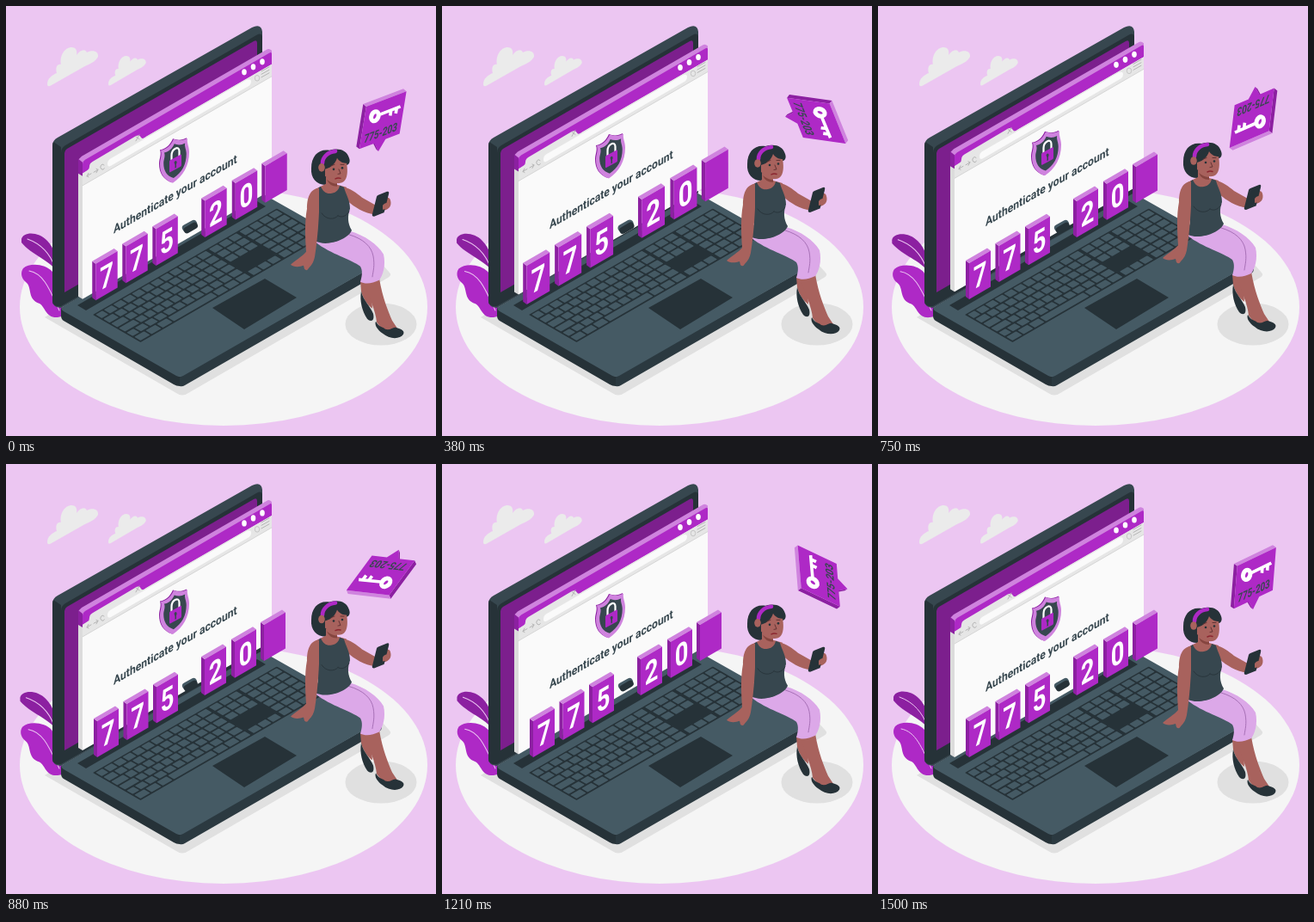
An HTML page for the animation above (1540 ms loop, 500 by 500 pixels).

```html
<!DOCTYPE html>
<html lang="en">
<head>
<meta charset="utf-8">
<title>Two-step sign-in</title>
<style>
html, body { margin: 0; width: 100%; height: 100%; overflow: hidden; background: #ecc6f2; }
svg { display: block; width: 100vw; height: 100vh; }
text { font-family: Roboto, "Open Sans", sans-serif; font-weight: 700; }
.p { fill: #ae29c6; } .l { fill: #cf83de; } .d { fill: #8c20a1; }
.k { fill: #263238; } .g { fill: #37474f; } .b { fill: #455a64; }
.s { fill: #a8625d; } .w { fill: #fafafa; } .e { fill: #e6e6e6; }
.line { fill: none; stroke-linecap: round; stroke-linejoin: round; }
</style>
</head>
<body>
<svg viewBox="0 0 500 500">
  <defs>
    <path id="cloud" d="M48 91C48 84 54 80 59 78C57 71 60 67 64 68C62 57 69 48 76 48C82 48 83 53 82 57C86 51 92 49 94 54C101 50 108 53 107 59C104 65 98 67 90 71L53 92Q48 95 48 91Z"/>
    <path id="shield" d="M180 168C187 167 192 162 195 155C200 157 206 157 211 154C210 160 213 163 213 170C213 186 206 198 194 206C184 203 179 195 179 184C179 178 182 174 180 168Z"/>
  </defs>
  <ellipse cx="253" cy="350" rx="237" ry="138" fill="#f5f5f5"/>
  <g fill="#ebebeb">
    <use href="#cloud"/>
    <use href="#cloud" transform="translate(83.5 21.5) scale(.74 .76)"/>
  </g>
  <ellipse cx="436" cy="370" rx="41.5" ry="24.5" fill="#e0e0e0"/>
  <path d="M45 362L64 350L437 300L446 310Q449 313 444 316L212 450Q205 455 198 450Z" fill="#e0e0e0"/>

  <g id="plant">
    <path class="d" d="M18 271C20 262 38 262 48 273C56 281 60 294 60 310C52 296 29 289 18 275Z"/>
    <path class="p" d="M20 305C28 298 46 300 54 309C59 317 60 332 60 344L68 353Q70 361 60 362C46 363 46 350 39 346C24 341 31 327 23 321C17 316 17 309 20 305Z"/>
    <path class="line" d="M25 271C42 277 52 290 57 304M27 308C44 311 51 330 62 354" stroke="#ecc6f2" stroke-width="1"/>
  </g>

  <!-- laptop -->
  <path class="k" d="M64 351L202 431V442Q198 442 195 440L67 366Q64 364 64 360Z"/>
  <path d="M202 431L437 297V306Q437 309 434 311L208 441Q205 443 202 442Z" fill="#2b3940"/>
  <path class="b" d="M67 349L296 217L434 295Q438 297 434 299L206 430Q202 432 198 430L67 355Q62 352 67 349Z"/>
  <path class="k" d="M83 348L93 354L302 233L292 227Z"/>
  <path class="g" d="M54 343V163Q54 156 60 153L286 25Q297 20 298 30V217L64 351Q54 350 54 343Z"/>
  <path class="k" d="M54 343V163Q54 160 55 158L64 164V349Q54 350 54 343Z"/>
  <path class="k" d="M64 349V171Q64 165 69 162L291 34Q298 30 298 37V217Z"/>
  <path d="M68 333V171Q68 168 71 166L288 41Q292 39 292 43V204Z" fill="#7c1f8d"/>
  <g id="keys" transform="matrix(.866 -.5 .866 .5 101 359)"></g>
  <path class="k" d="M240 351L301 317L338 339L277 376Z"/>

  <g id="window">
    <path class="l" d="M84 179L88 175L303 51Q306 49 309 52V56L89 184Z"/>
    <path class="d" d="M84 178L89 182V209L84 206Z"/>
    <path d="M84 195L89 198V341L84 338Z" fill="#dcdcdc"/>
    <path class="w" d="M89 184L309 57V214L89 341Z"/>
    <path class="p" d="M89 184Q89 181 92 179L306 55Q309 53 309 56V68L89 195Z"/>
    <path class="e" d="M89 195L95 191Q97 190 97 187Q97 183 101 181L150 152Q155 149 157 153Q159 156 163 152L309 68V82L89 209Z"/>
    <path class="w" d="M121 178L280 86Q285 84 285 88Q285 92 281 94L122 186Q118 188 118 184Q118 180 121 178Z"/>
    <path class="line" d="M89 209L309 82" stroke="#d6d6d6" stroke-width="1"/>
    <path class="line" d="M151 152L155 155M155 150L151 157M94 198L99 195M96 194.500L94 198L96 199M102 193.500L107 190.500M105 189.500L107 190.500L105 194M114 185A2.500 3 0 1 0 114.500 189M297 76L306 71M297 79.500L306 74.500M297 83L306 78" stroke="#b5b5b5" stroke-width="1"/>
    <ellipse cx="292" cy="84" rx="2.700" ry="3.300" fill="none" stroke="#c6c6c6"/>
    <g fill="#fff">
      <ellipse cx="277" cy="77" rx="2.800" ry="3.600"/>
      <ellipse cx="287.500" cy="71" rx="2.800" ry="3.600"/>
      <ellipse cx="298" cy="65" rx="2.800" ry="3.600"/>
    </g>
    <use href="#shield" class="d" x="-1" y="-.5"/>
    <use href="#shield" class="l"/>
    <use href="#shield" class="g" transform="translate(43.600 39.600) scale(.78)"/>
    <path class="line" d="M192.500 181V174C192.500 166 201.500 162 201.500 169V176" stroke="#fff" stroke-width="2.200"/>
    <path class="p" d="M190 181Q190 180 191 179.500L203 173Q204 172.500 204 174V185Q204 186.500 203 187L191 193.500Q190 194 190 192.500Z"/>
    <path class="g" d="M195.500 182Q197 179 198.500 181Q199 183 198 184V188L196.500 189V185Z"/>
    <text class="g" font-size="14" transform="matrix(.866 -.5 0 1 125 265)">Authenticate your account</text>
  </g>

  <g id="code">
    <path class="line" d="M209 258L218 253" stroke="#455a64" stroke-width="8"/>
    <path class="line" d="M210.500 260.500L219 255.500" stroke="#263238" stroke-width="7.500"/>
  </g>

  <g id="girl">
    <!-- legs -->
    <path class="s" d="M412 320L424 322L426 352C420 348 415 340 413 332Z"/>
    <path class="k" d="M413 332C416 344 423 348 427 358C429 367 424 368 420 364C414 355 411 343 413 332Z"/>
    <path class="s" d="M417 321L434 317C438 340 444 354 449 366L455 375L440 379L431 368C430 354 422 340 417 321Z"/>
    <path class="k" d="M430 367C434 374 438 373 441 376C447 378 450 373 453 374C460 376 464 378 462 382C458 388 446 388 438 381C432 377 428 371 430 367Z"/>
    <path d="M359 270C372 280 390 275 400 262C417 267 432 277 439 289C442 302 438 314 434 319C426 323 418 324 412 321C414 315 415 308 412 303C402 295 378 289 360 275Z" fill="#dca8e8"/>
    <path class="line" d="M399 266C416 271 425 280 427 291C429 302 427 308 426 315" stroke="#9a62aa" stroke-width=".8"/>
    <!-- upper body -->
    <path class="k" d="M355 189C355 174 364 166 376 168C386 165 396 167 399 177C401 182 398 186 395 185L384 192L373 208C362 209 354 201 355 189Z"/>
    <path class="s" d="M360 213L372 207V199L385 200V208L396 211L394 226L366 228Z"/>
    <path class="s" d="M390 210C401 212 408 218 414 223L430 232L437 229C439 222 446 221 447 226C449 233 445 237 439 238L430 243C416 241 405 234 397 227Z"/>
    <path class="g" d="M363 212L366 210C369 217 373 219 379 218C384 217 387 214 388 209L393 211C395 219 400 226 400 236C397 244 397 253 402 261C398 272 372 281 359 273C364 262 364 250 361 242C362 232 364 222 363 212Z"/>
    <path class="line" d="M367 241C372 249 382 249 386 244M386 244C391 247 396 244 399 239" stroke="#263238" stroke-width=".8"/>
    <path class="s" d="M364 212C353 213 350 224 350 236C347 252 348 270 349 286C344 292 336 296 331 301C334 304 341 304 346 302L347 306Q350 309 352 305C356 301 358 297 359 292C361 280 363 262 364 240Z"/>
    <path class="k" d="M431 222Q431 221 433 220L443 216Q446 215 445 219L440 239Q440 241 438 241L428 245Q425 245 426 242Z"/>
    <path class="s" d="M438 232Q441 228 446 229Q448 234 443 236L438 237Z"/>
    <!-- head -->
    <path d="M373 202Q379 207 385 207V210Q376 210 373 202Z" fill="#85453f"/>
    <path class="s" d="M371 190C379 188 383 183 385 177C388 182 393 183 396 183C397 188 398 198 394 203C390 208 382 207 376 202L371 198Z"/>
    <path class="line" d="M368 183C368 176 374 170 383 169" stroke="#ae29c6" stroke-width="4.600"/>
    <ellipse class="s" cx="367" cy="188" rx="3.800" ry="4.800"/>
    <circle class="k" cx="381" cy="190" r="1.300"/>
    <circle class="k" cx="391" cy="188.500" r="1.300"/>
    <path class="line" d="M378 186L382 184.500M389 184.500L393 184.500M387 190L389 195L386 195.500" stroke="#5d2f30" stroke-width=".9"/>
    <path class="line" d="M383 201Q386 199.500 389 200.500" stroke="#8b2630" stroke-width="1.500"/>
  </g>

  <g id="bubble">
    <path class="d" d="M412.800 117.700L416.800 120V170L412.800 167.700ZM433 160L429.500 158L436 167L439 169Z"/>
    <path class="l" d="M412.800 117.700L456.100 92.700L460.100 95L416.800 120Z"/>
    <path class="p" d="M416.800 120L460.100 95V145L445 153.700L439 169L433 160.600L416.800 170Z"/>
    <g fill="none" stroke="#fff">
      <ellipse cx="428.500" cy="129.500" rx="4" ry="5.800" stroke-width="5" transform="rotate(14 428.5 129.500)"/>
      <path d="M434 126.500L456 113.500M446 120V126M452 116.500V122.500" stroke-width="3.600"/>
    </g>
    <text class="g" font-size="14" transform="matrix(.667 -.385 0 1 420.500 162.500)">775-203</text>
  </g>
</svg>
<script>
const LOOP = 1540, FRAMES = 37, FRAME_MS = 1000 / 24;
const el = id => document.getElementById(id);
const move = (id, value) => el(id).setAttribute('transform', value);

function tile(x, digit) {
  const y = 341 - (x - 102) * .577;
  return `<g transform="translate(${x} ${y})">
    <path class="d" d="M0 -45L4 -42V0L0 -3Z"/>
    <path class="l" d="M0 -45L25 -59.500L29 -56.500L4 -42Z"/>
    <path class="p" d="M4 -42L29 -56.500V-14.500L4 0Z"/>
    <text font-size="36" fill="#fff" text-anchor="middle" transform="matrix(.76 -.44 0 1 16.500 -15.500)">${digit}</text>
  </g>`;
}

// keyboard in flat coordinates; the group's matrix lays it down
function keyboard() {
  const rect = (x, y, w, h, c) =>
    `<rect class="${c}" x="${x}" y="${y}" width="${w}" height="${h}" rx="1"/>`;
  let out = rect(0, 0, 247, 64, 'k');
  for (let r = 0; r < 6; r++) {
    const y = 1.7 + r * 10.4;
    const fill = (from, to, n) => {
      const w = (to - from) / n;
      for (let i = 0; i < n; i++) out += rect(from + i * w, y, w - 2, 8.3, 'b');
    };
    if (r === 5) {
      fill(2, 47, 3);
      fill(47, 107, 1);
      fill(107, 152, 3);
    } else {
      const edge = 13 + (r % 4) * 3.5;
      fill(2, edge, 1);
      fill(edge, 138, 10);
      fill(138, 152, 1);
    }
    if (r < 3 || r === 5) fill(154, 193, 3);
    fill(195, 247, 4);
  }
  return out;
}

el('keys').innerHTML = keyboard();
el('code').innerHTML += [[102, 7], [136.5, 7], [171, 5], [227, 2], [262, 0], [296, '']]
  .map(([x, digit]) => tile(x, digit)).join('');

function draw(ms) {
  const n = Math.min(FRAMES, Math.floor((ms % LOOP + 5) / FRAME_MS) + 1);
  const wave = (1 - Math.cos(n / FRAMES * 2 * Math.PI)) / 2;
  const rise = Math.pow(wave, .8);
  const pulse = 1 + .078 * (n < 16 ? Math.sin(Math.PI * n / 15.5) : 0);
  move('window', `translate(0 ${-8.7 * rise})`);
  move('girl', `translate(0 ${-8 * rise})`);
  move('plant', `rotate(${-1.2 * wave} 62 355)`);
  move('code', `translate(213 255) scale(${pulse}) translate(-213 -255)`);
  move('bubble', `rotate(${9.87 * n - .7} 436.5 131.5)`);
}

const start = performance.now();
function tick() {
  draw(performance.now() - start);
  requestAnimationFrame(tick);
}
tick();
</script>
</body>
</html>
```
